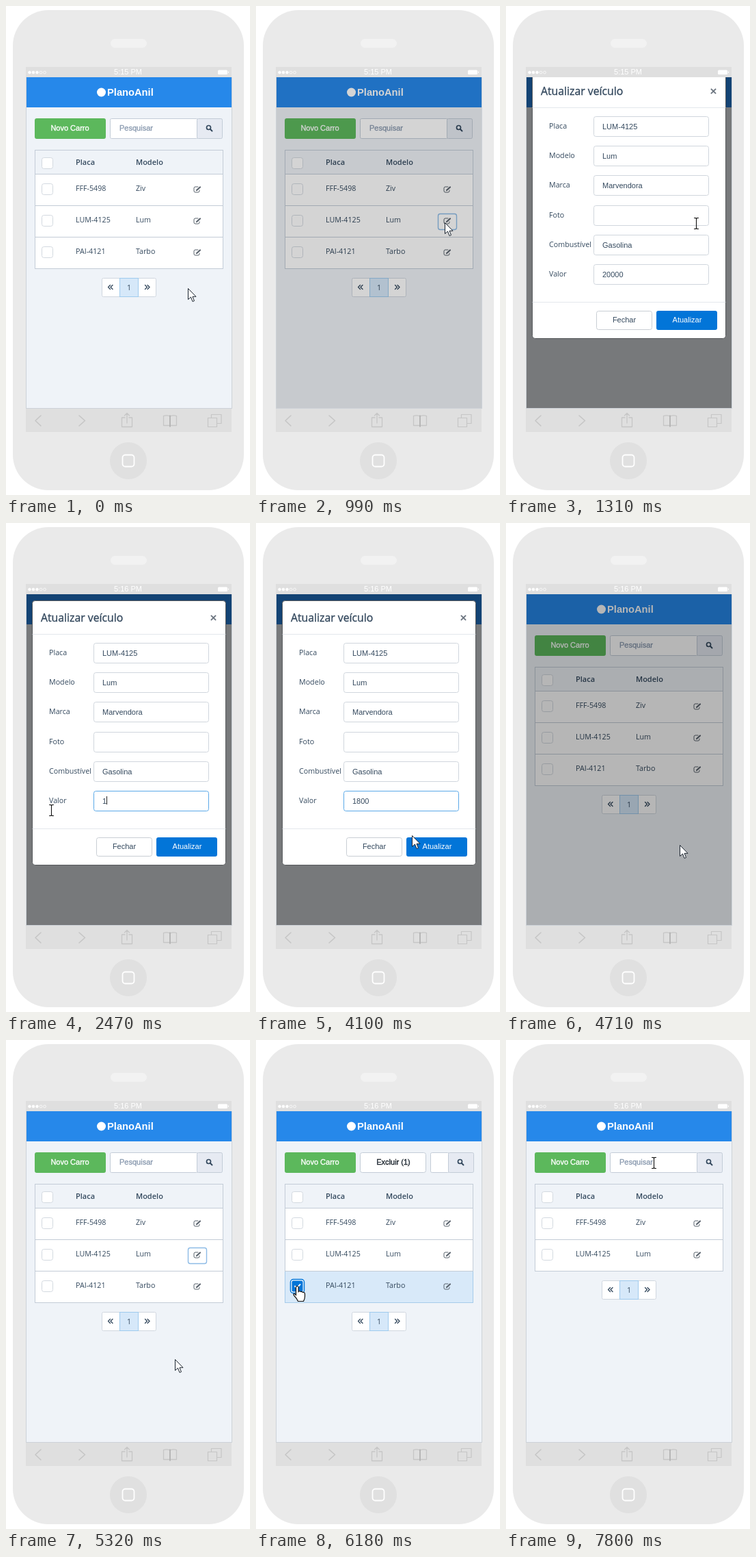
Recreate the animation shown at these times as an HTML page. Size 357 by 714 pixels, loop 8 s.

```html
<!DOCTYPE html>
<html lang="pt-BR">
<head>
<meta charset="utf-8">
<title>Cadastro de veículos</title>
<style>
html, body { margin: 0; width: 100%; height: 100%; overflow: hidden; background: #fff; }
svg { display: block; }
text { font: 10.7px "Open Sans", "Noto Sans", sans-serif; fill: #34495e; white-space: pre; }
.head { font-weight: 600; font-size: 11px; }
.ui { font: 11px "Liberation Sans", Arial, sans-serif; }
.mid { stroke: currentColor; stroke-width: .35px; }
.white { fill: #fff; color: #fff; }
.mute { fill: #8b9bb0; color: #8b9bb0; }
.title { font-size: 15.8px; color: #34495e; }
.brand { font: bold 14.7px "Liberation Sans", Arial, sans-serif; fill: #fff; }
.close { font: bold 17px "Liberation Sans", Arial, sans-serif; fill: #6d7681; }
.center { text-anchor: middle; }
.line { fill: none; stroke-linecap: round; stroke-linejoin: round; }
</style>
</head>
<body>
<svg id="stage" width="100%" height="100%" viewBox="0 0 357 714"></svg>
<script>
const LOOP = 8000;
const BORDER = '#c3ccd7';

// Markup helpers
const rect = (x, y, w, h, r, fill, stroke = 'none', extra = '') =>
  `<rect x="${x}" y="${y}" width="${w}" height="${h}" rx="${r}" fill="${fill}" stroke="${stroke}" ${extra}/>`;
const text = (x, y, str, cls = '', id = '') =>
  `<text x="${x}" y="${y}" class="${cls}" id="${id}">${str}</text>`;
const line = (d, color, width = 1, extra = '') =>
  `<path class="line" d="${d}" stroke="${color}" stroke-width="${width}" ${extra}/>`;
const group = (id, content) => `<g id="${id}">${content}</g>`;

const checkbox = y => rect(52.5, y + .5, 16, 16, 3, '#fff', '#d3d9e0');
const editIcon = y =>
  line(`M281 ${y - 4}H277Q275 ${y - 4} 275 ${y - 2}V${y + 2}Q275 ${y + 4} 277 ${y + 4}H281Q283 ${y + 4} 283 ${y + 2}V${y + 1}`, '#5b646e') +
  line(`M279 ${y + 1}L284 ${y - 3.5}`, '#5b646e', 2.2);
const chevrons = (x, dir) => [0, 3.5].map(dx =>
  line(`M${x + dir * (dx - 3)} 407.5l${dir * 3} 3l${-dir * 3} 3`, '#34495e', 1.4)).join('');

const tableRow = (y, plate, model) =>
  rect(42.5, y + .5, 275, 46, 0, '#fff', BORDER) + checkbox(y + 14) +
  text(102, y + 25, plate) + text(190, y + 25, model) + editIcon(y + 23);

const searchBox = (x, inputWidth) =>
  rect(x + .5, 164.5, inputWidth, 29, 2, '#fff', BORDER) +
  rect(x + inputWidth - .5, 164.5, 37, 29, 2, '#e6eaf2', BORDER) +
  `<circle cx="${x + inputWidth + 16.5}" cy="177.5" r="3" fill="none" stroke="#34495e" stroke-width="1.7"/>` +
  line(`M${x + inputWidth + 19} 180l2.5 2.5`, '#34495e', 2);

const phone = () =>
  rect(10, 6, 338, 701, 52, '#eaeaea') +
  rect(153, 48, 53, 13, 6.5, '#f2f2f2') +
  rect(29, 89, 301, 533, 0, '#dfdfdf') +
  [34.5, 40, 45.5, 51, 56.5].map((x, i) =>
    `<circle cx="${x}" cy="97" r="1.9" fill="${i < 3 ? '#fff' : 'none'}" stroke="#fff" stroke-width=".7"/>`).join('') +
  text(178.5, 100, '', 'ui white center', 'clock') +
  rect(310, 93.5, 14, 6.5, 1.5, '#fff') + rect(325, 95.5, 1, 2.5, 0, '#fff') +
  line('M51 598L43 605.5L51 613M107 598L115.5 605.5L107 613', '#c6c6c6', 1.6) +
  line('M174 601H169.5V614.5H184.5V601H180M177 609V594.5M173.5 598L177 594.5L180.5 598', '#c6c6c6', 1.3) +
  line('M240 599Q235 597 230.5 598.5V612.5H249.5V598.5Q245 597 240 599V614', '#c6c6c6', 1.3) +
  line('M240 598V614', '#aaa', 1.3) +
  line('M295.5 601.5H308.5V614.5H295.5ZM300.5 601V596.5H315V609.5H309', '#c6c6c6', 1.2) +
  '<circle cx="179" cy="664" r="27" fill="#e0e0e0"/>' +
  rect(170.5, 655.5, 17, 17, 4, 'none', '#fff', 'stroke-width="1.8"');

const page = () =>
  rect(29, 104, 302, 484, 0, '#eff3f8') +
  rect(29, 104, 302, 44, 0, '#2688ea') +
  '<circle cx="139.5" cy="126" r="6.5" fill="#fff"/>' +
  text(148, 131, 'PlanoAnil', 'brand') +
  rect(42, 164, 104, 30, 3, '#5cb85c') +
  text(93.5, 182, 'Novo Carro', 'ui mid white center') +
  group('search', searchBox(152, 128) + text(166, 182, 'Pesquisar', 'ui mid mute')) +
  group('selectionBar',
    rect(152.5, 164.5, 96, 29, 3, '#fff', BORDER, 'id="deleteButton"') +
    text(201, 182, 'Excluir (1)', 'ui mid center') + searchBox(255, 27)) +
  rect(42.5, 210.5, 275, 35, 0, '#eff3f8', BORDER) + checkbox(221) +
  text(102, 232, 'Placa', 'head') + text(190, 232, 'Modelo', 'head') +
  tableRow(245, 'FFF-5498', 'Ziv') +
  group('focusRing', rect(266.5, 303.5, 27, 23, 3, 'none', '#8dbbe6', 'stroke-width="1.4"')) +
  group('lastRow', tableRow(337, 'PAI-4121', 'Tarbo') +
    group('checkedRow',
      rect(42.5, 337.5, 275, 46, 0, '#d8e9f9', '#a6cbea') +
      rect(50.5, 349.5, 20, 20, 4, '#fff', '#0275d8', 'stroke-width="1.5"') +
      rect(52.5, 351.5, 16, 16, 2, '#0275d8') +
      line('M57 359.5l2.5 2.5l5 -5', '#fff', 1.8) +
      text(102, 362, 'PAI-4121') + text(190, 362, 'Tarbo') + editIcon(360))) +
  group('middleRow', tableRow(291, 'LUM-4125', 'Lum')) +
  group('pager',
    rect(140.5, 397.5, 79, 27, 2, '#fff', '#d0d7df') +
    rect(166.5, 397.5, 27, 27, 0, '#d6e8f9', '#9fcbee') +
    chevrons(153, -1) + text(180, 415, '1', 'center') + chevrons(206.5, 1));

const FIELDS = [['Placa', 'LUM-4125'], ['Modelo', 'Lum'], ['Marca', 'Marvendora'],
  ['Foto', ''], ['Combustível', 'Gasolina'], ['Valor', '']];

const modal = () =>
  rect(38.5, 113.5, 283, 386, 4, '#fff', '#55585b') +
  text(51, 144, 'Atualizar veículo', 'title mid') +
  text(303.5, 144, '×', 'close center') +
  line('M39 162.5H321M39 446.5H321', '#e3e7ec') +
  FIELDS.map(([label, value], i) => {
    const y = 175 + Math.round(i * 43.2);
    const last = i === FIELDS.length - 1;
    return text(63, y + 18, label) +
      rect(128.5, y + .5, 168, 29, 3, '#fff', '#d0d6dd', last ? 'id="priceBox"' : '') +
      (last ? rect(141, 398, 0, 14, 0, '#3390ff', 'none', 'id="selection"') : '') +
      text(141, y + 19, value, 'ui', last ? 'price' : '');
  }).join('') +
  rect(147, 399, 1, 12, 0, '#222', 'none', 'id="caret"') +
  rect(132.5, 459.5, 81, 27, 3, '#fff', '#c9ced4') + text(173, 476, 'Fechar', 'ui center') +
  rect(220, 459, 89, 28, 3, '#0275d8', 'none', 'id="saveButton"') +
  text(265, 476, 'Atualizar', 'ui white center');

const pointers = () =>
  '<path id="arrow" d="M0 0V16L4 12.5L6.5 19L9 18L6.5 11.8H11.5Z" fill="#fff" stroke="#1c2530"/>' +
  line('M-3 -8H-1L0 -7L1 -8H3M0 -7V7M-3 8H-1L0 7L1 8H3', '#111', 1.1, 'id="beam"') +
  '<path id="hand" d="M-2 1.5Q-2 0 -.2 0T1.6 1.5V8Q3 6.5 5 8Q6.5 7.5 8 9Q11 8.5 11 11.5V15Q11 18 9 22H1Q-1 17.5 -5 13.5Q-6.5 11 -4.5 10.8L-2 13Z" fill="#fff" stroke="#111" stroke-width="1.2"/>';

document.getElementById('stage').innerHTML = phone() +
  `<svg x="29" y="104" width="302" height="484" viewBox="29 104 302 484">${page()}
   ${rect(29.5, 103, 301, 484.5, 0, 'none', '#cdd2d8')}
   ${rect(30, 104, 300, 483, 0, '#000', 'none', 'id="backdrop"')}${group('modal', modal())}</svg>` +
  group('cursor', pointers());

const el = id => document.getElementById(id);
const set = (id, name, value) => el(id).setAttribute(name, value);
const show = (id, on) => set(id, 'opacity', +on);
const clamp = v => Math.max(0, Math.min(1, v));

// Holds time on a coarse grid, as a screen recording does
const sample = (t, start, end, step) =>
  t < start ? start - step : t >= end ? end : start + Math.floor((t - start) / step) * step;

// start, end, sampling step, destination
const MOVES = [
  [360, 740, 76, 276, 316],
  [1310, 1311, 1, 278, 317],
  [1600, 1910, 77.5, 180, 408],
  [1910, 2220, 77.5, 66, 419],
  [3950, 4100, 75, 228, 456],
  [4175, 4325, 75, 254, 470],
  [5320, 5950, 78.75, 60, 359],
  [7020, 7410, 78, 216, 179]
];

function cursorAt(t) {
  let x = 266, y = 412;
  for (const [start, end, step, toX, toY] of MOVES) {
    if (t < start) break;
    const p = clamp((sample(t, start, end, step) - start + step) / (end - start + step));
    const eased = p * p * (3 - 2 * p);
    x += (toX - x) * eased;
    y += (toY - y) * eased;
  }
  return [x, y];
}

function pointerAt(t) {
  if (t >= 1310 && t < 3950 || t >= 7800) return 'beam';
  if (t >= 4250 && t < 4550 || t >= 5870 && t < 7100 || t >= 7332) return 'hand';
  return 'arrow';
}

function drawModal(t) {
  const opening = sample(t, 990, 1370, 80);
  const closing = sample(t, 3950, 4780, 75);
  const slideIn = Math.pow(1 - clamp((opening - 1125) / 245), 1.4);
  const slideOut = 1 - Math.pow(1 - clamp((closing - 4330) / 300), 2);
  set('backdrop', 'opacity', .5 * clamp((opening - 940) / 150) * clamp((4780 - closing) / 140));
  set('modal', 'opacity', clamp((opening - 1110) / 130) * clamp((4480 - closing) / 150));
  set('modal', 'transform', `translate(0 ${-Math.round(100 * Math.max(slideIn, slideOut))})`);
  set('saveButton', 'fill', t >= 4250 ? '#025aa5' : '#0275d8');
}

function drawPrice(t, cursorX) {
  const typed = [2470, 2620, 3080, 3310].filter(time => t >= time).length;
  const selecting = t >= 1910 && !typed;
  const left = Math.max(141, Math.min(171.5, cursorX));
  const price = el('price');
  price.textContent = typed ? '1800'.slice(0, typed) : '20000';
  price.style.fill = selecting && left === 141 ? '#fff' : '';
  set('selection', 'x', left);
  set('selection', 'width', selecting ? 171.5 - left : 0);
  set('caret', 'x', Math.round(141 + typed * 6.1));
  show('caret', typed && t < 3780);
  set('priceBox', 'stroke', t >= 1910 ? '#5ba9e8' : '#d0d6dd');
}

function drawList(t) {
  const deleted = t >= 7730;
  const checked = t >= 6100 && !deleted;
  show('lastRow', !deleted);
  show('checkedRow', checked);
  show('selectionBar', checked);
  show('search', !checked);
  set('pager', 'transform', `translate(0 ${deleted ? -46 : 0})`);
  set('deleteButton', 'fill', t >= 7332 ? '#e6e6e6' : '#fff');
  const opened = t >= 990 && t < 1310;
  const returned = t >= 4940 && t < 5870;
  show('focusRing', 0);
  set('focusRing', 'opacity', opened ? 1 : returned ? (t < 5000 ? .5 : 1) : 0);
}

// The ring belongs above the row it surrounds
el('middleRow').after(el('focusRing'));

function draw(t) {
  const [x, y] = cursorAt(t);
  const pointer = pointerAt(t);
  el('clock').textContent = t < 1910 ? '5:15 PM' : '5:16 PM';
  drawList(t);
  drawModal(t);
  drawPrice(t, x);
  set('cursor', 'transform', `translate(${Math.round(x) + .5} ${Math.round(y) + .5})`);
  for (const id of ['arrow', 'beam', 'hand']) show(id, id === pointer);
}

const origin = performance.now();
function frame() {
  draw((performance.now() - origin) % LOOP);
  requestAnimationFrame(frame);
}
frame();
</script>
</body>
</html>
```
